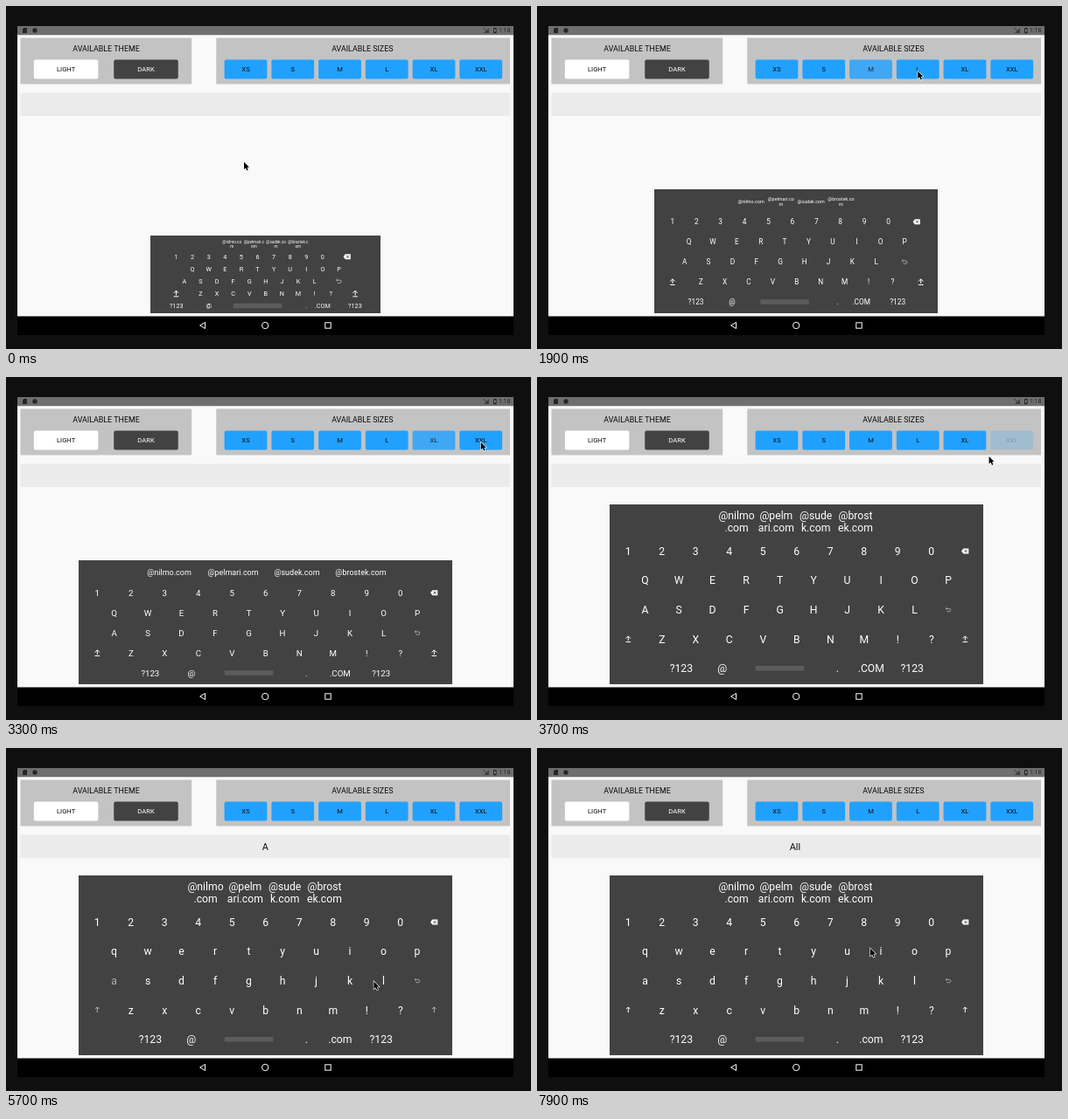
An HTML page with a canvas that plays this animation: 600 by 393 pixels, repeating every 8 s.

```html
<!DOCTYPE html>
<html lang="en">
<head>
<meta charset="utf-8">
<title>Resizable keyboard</title>
<style>
  html, body { margin: 0; width: 100%; height: 100%; overflow: hidden; background: #0f0f0f; }
  canvas { display: block; width: 600px; height: 393px; }
</style>
</head>
<body>
<canvas id="stage"></canvas>
<script>
const LOOP = 8000, STEP = 100;
const HOLD = 150, FADE = 330, TRAVEL = 350;
const CX = 296.8, BOTTOM = 350.7;
const INK = '#0a0a0a', KEYBOARD = '#424242';
const canvas = document.getElementById('stage');
const ctx = canvas.getContext('2d');
const ratio = window.devicePixelRatio || 1;
canvas.width = 600 * ratio;
canvas.height = 393 * ratio;

// pitch: key width, row: row height, hint: suggestion text size, gap: suggestion spacing
const XS = { pitch: 18.6, row: 14.1, hint: 4.6, gap: 25.2 };
const S = { ...XS, row: 18.6 };
const M = { pitch: 27.4, row: 23, hint: 5.4, gap: 34.3 };
const L = { pitch: 35, row: 23, hint: 7.2, gap: 60 };
const XL = { pitch: 38.5, row: 23, hint: 9, gap: 73 };
const XXL = { ...XL, row: 33.6, hint: 12.2, gap: 45.3 };
const SIZES = { XS, S, M, L, XL, XXL };
const HINTS = ['@nilmo.com', '@pelmari.com', '@sudek.com', '@brostek.com'];

// [control, released at]; size buttons are upper case, keys lower case
const CLICKS = [
  ['S', 850], ['M', 1650], ['L', 2350], ['XL', 3050], ['XXL', 3700],
  ['a', 5540], ['l', 6250], ['l', 6500], ['space', 7200]
];

const buttonX = i => 274 + 53.75 * i;
const rowWidth = row => row.reduce((sum, key) => sum + key[1], 0);

function keyRows(pitch) {
  const wide = Math.max(37.2, pitch);
  const keys = str => [...str].map(c => [c, pitch]);
  return [
    [...keys('1234567890'), ['erase', wide]],
    keys('QWERTYUIOP'),
    [...keys('ASDFGHJKL'), ['enter', wide]],
    [['shift', wide], ...keys('ZXCVBNM!?'), ['shift', wide]],
    [['?123', 55.4], ['@', pitch], ['space', 93], ['.', pitch], ['.COM', pitch], ['?123', 55.4]]
  ];
}

function placeKeys({ pitch, row }) {
  return keyRows(pitch).flatMap((keys, r) => {
    let x = CX - rowWidth(keys) / 2;
    return keys.map(([name, w]) => {
      x += w;
      return { name, w, x: x - w / 2, y: BOTTOM - (4.5 - r) * row };
    });
  });
}

function locate(id) {
  if (SIZES[id]) return [buttonX(Object.keys(SIZES).indexOf(id)), 74];
  const key = placeKeys(XXL).find(k => k.name.toLowerCase() === id);
  return [key.x, key.y];
}

// The pointer reaches each control, waits for the press, then moves on.
function planRoute() {
  const route = [[0, 272, 178], [100, 272, 178]];
  for (const [id, up] of CLICKS) {
    if (id === 'a') route.push([4400, 225, 272]);
    const leave = up - HOLD, spot = locate(id);
    route.push([Math.min(leave, route.at(-1)[0] + TRAVEL), ...spot], [leave, ...spot]);
  }
  return [...route, [7900, 381, 229], [LOOP, 381, 229]];
}
const ROUTE = planRoute();

function opacity(id, t) {
  let value = 1;
  for (const [name, up] of CLICKS) {
    const down = up - HOLD;
    if (name !== id || t < down) continue;
    value = Math.min(value, t < up ? Math.max(0.2, 1 - (t - down) / 110) : 0.2 + 0.8 * (t - up) / FADE);
  }
  return value;
}

function rect(x, y, w, h, color, radius = 0) {
  ctx.fillStyle = color;
  ctx.beginPath();
  ctx.roundRect(x, y, w, h, radius);
  ctx.fill();
}

function setFont(size) {
  ctx.font = `${size}px Roboto, sans-serif`;
}

function label(str, x, y, size, color = '#fff') {
  setFont(size);
  ctx.textAlign = 'center';
  ctx.fillStyle = color;
  ctx.fillText(str, x, y + size * 0.355);
}

// Breaks a word in two when it is too wide and the row has space for two lines.
function wrappedLabel(str, x, y, size, width, height) {
  const leading = size * 1.18;
  setFont(size);
  let cut = str.length;
  while (ctx.measureText(str.slice(0, cut)).width > width * 0.93) cut--;
  if (cut === str.length || height < 2 * leading) return label(str, x, y, size);
  label(str.slice(0, cut), x, y - leading / 2, size);
  label(str.slice(cut), x, y + leading / 2, size);
}

function trace(points, close) {
  ctx.beginPath();
  points.forEach(([x, y]) => ctx.lineTo(x, y));
  if (close) ctx.closePath();
}

function line(points, color, width, close) {
  trace(points, close);
  ctx.strokeStyle = color;
  ctx.lineWidth = width;
  ctx.stroke();
}

function shape(points, color) {
  trace(points, true);
  ctx.fillStyle = color;
  ctx.fill();
}

function button(str, mid, w, color, ink = INK, alpha = 1) {
  ctx.globalAlpha = alpha;
  rect(mid - w / 2, 61.5, w, 22, color, 2);
  label(str, mid, 72.7, 7.6, ink);
  ctx.globalAlpha = 1;
}

function drawStatusBar() {
  const dark = '#262626';
  rect(13, 23, 567, 10.2, '#6f6f6f');
  shape([[20.4, 25], [24, 25], [24, 31], [19, 31], [19, 26.4]], dark);
  ctx.beginPath();
  ctx.arc(33, 28, 2.7, 0, 7);
  ctx.fill();
  shape([[552, 25], [552, 31], [546, 31]], '#444');
  line([[545.5, 25], [551, 30.5]], dark, 0.8);
  rect(557, 25, 3.6, 6.2, dark, 0.6);
  rect(558.1, 26.6, 1.4, 3, '#999');
  label('1:18', 569.7, 28, 6.9, dark);
}

function drawNavBar() {
  rect(13, 355.5, 567, 21.5, '#000');
  line([[221.6, 366], [227.6, 362.4], [227.6, 369.6]], '#fff', 1, true);
  ctx.beginPath();
  ctx.arc(296.2, 366, 3.7, 0, 7);
  ctx.stroke();
  ctx.strokeRect(364.8, 362.8, 6.4, 6.4);
}

function drawApp(t, typed) {
  rect(0, 0, 600, 393, '#0f0f0f');
  rect(13, 23, 567, 354, '#f9f9f9');
  drawStatusBar();
  rect(16.5, 36.5, 195.7, 53, '#c3c3c3');
  rect(240.3, 36.5, 335.7, 53, '#c3c3c3');
  label('AVAILABLE THEME', 114.5, 48.5, 8.85, INK);
  label('AVAILABLE SIZES', 407.3, 48.5, 8.85, INK);
  button('LIGHT', 68.6, 73.5, '#fff');
  button('DARK', 160, 73.5, '#424242', '#fff');
  Object.keys(SIZES).forEach((name, i) =>
    button(name, buttonX(i), 48.8, '#21a1ff', INK, opacity(name, t)));
  rect(16.5, 99.5, 559.5, 26.5, '#ebebeb');
  label(typed, 296.3, 113.3, 11, INK);
  drawNavBar();
}

const ICONS = {
  erase(lower) {
    shape([[-4.2, 0], [-2, -3], [4, -3], [4, 3], [-2, 3]], '#fff');
    for (const s of [-1.5, 1.5]) line([[-0.8, s], [2.2, -s]], KEYBOARD, 0.9);
  },
  enter() {
    line([[-3, -1.3], [1.6, -1.3], [2.8, -0.3], [2.8, 1], [1.6, 2], [-1.6, 2]], '#bbb', 0.8);
    line([[-1.6, -2.6], [-3, -1.3], [-1.6, 0]], '#bbb', 0.8);
  },
  shift(lower) {
    const half = lower ? 2.2 : 2.7;
    line([[-half, half - 3.4], [0, -3.4], [half, half - 3.4]], '#fff', 1);
    line([[0, -3.2], [0, lower ? 2.8 : 1.8]], '#fff', 1);
    if (!lower) line([[-2.8, 3.3], [2.8, 3.3]], '#fff', 1);
  },
  space() {
    rect(-27.8, -3, 55.6, 5.6, '#5c5c5c', 0.5);
  }
};

function drawKeyboard(t, lower) {
  const chosen = CLICKS.filter(([id, up]) => SIZES[id] && t >= up).pop();
  const size = SIZES[chosen ? chosen[0] : 'XS'];
  const { pitch, row, hint, gap } = size;
  const font = 4.9 + 0.125 * pitch + 0.236 * Math.max(0, row - 23);
  const half = Math.max(...keyRows(pitch).map(rowWidth)) / 2 + 1.4;
  const left = Math.round(296.4 - half), right = Math.round(296.4 + half);
  const top = Math.round(BOTTOM - 6 * row - 2.9);
  rect(left, top, right - left, 352 - top, KEYBOARD);

  HINTS.forEach((str, i) =>
    wrappedLabel(str, 296 + (i - 1.5) * gap, BOTTOM - 5.5 * row, hint, gap, row));

  for (const { name, x, y, w } of placeKeys(size)) {
    const text = lower ? name.toLowerCase() : name;
    // Shift changes together with the first letter typed.
    ctx.globalAlpha = name === 'shift' ? (lower ? opacity('a', t) : 1) : opacity(name.toLowerCase(), t);
    if (ICONS[name]) {
      ctx.save();
      ctx.translate(x, y);
      ICONS[name](lower);
      ctx.restore();
    } else {
      wrappedLabel(text, x, y, font, w, row);
    }
    ctx.globalAlpha = 1;
  }
}

function drawPointer(t) {
  const i = ROUTE.findIndex(p => p[0] > t);
  const [t0, x0, y0] = ROUTE[i - 1], [t1, x1, y1] = ROUTE[i];
  const u = (t - t0) / (t1 - t0), k = u * u * (3 - 2 * u);
  const arrow = [[0, 0], [0, 8.4], [2, 6.7], [3.4, 9.8], [4.8, 9.2], [3.5, 6.2], [5.9, 6]];
  ctx.save();
  ctx.translate(x0 + (x1 - x0) * k, y0 + (y1 - y0) * k + 0.8);
  line(arrow, '#fff', 1.2, true);
  shape(arrow, '#000');
  ctx.restore();
}

function frame(now) {
  const t = Math.floor(now % LOOP / STEP) * STEP;
  const keys = CLICKS.filter(([id, up]) => !SIZES[id] && t >= up);
  const typed = keys.map(([id], i) => id === 'space' ? ' ' : i ? id : id.toUpperCase()).join('');
  ctx.setTransform(ratio, 0, 0, ratio, 0, 0);
  drawApp(t, typed);
  drawKeyboard(t, typed !== '');
  drawPointer(t);
  requestAnimationFrame(frame);
}
requestAnimationFrame(frame);
</script>
</body>
</html>
```
